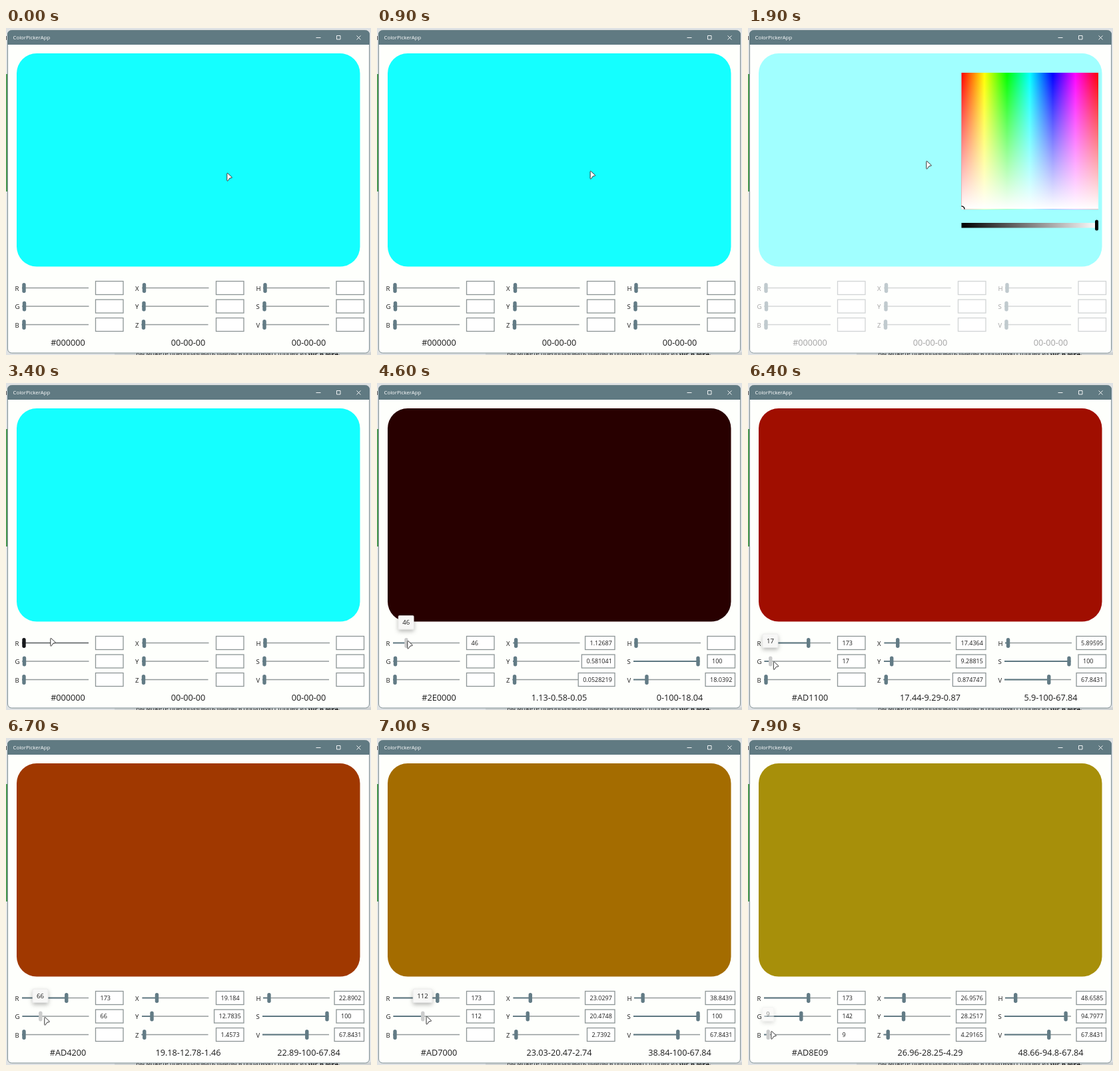
Recreate the animation shown at these times as an HTML page. Size 548 by 490 pixels, loop 8 s.

```html
<!DOCTYPE html>
<html lang="en">
<head>
<meta charset="utf-8">
<title>Color picker</title>
<style>
html, body { margin: 0; width: 100%; height: 100%; overflow: hidden; background: #dfe2e4; }
svg { display: block; width: 548px; height: 490px; }
text { font-family: "Open Sans", "Noto Sans", sans-serif; fill: #1c1c1c; white-space: pre; }
.entry { font-size: 9px; }
.name { font-size: 9.6px; }
.sum { font-size: 12.7px; text-anchor: middle; }
.tip { font-size: 9.6px; text-anchor: middle; }
</style>
</head>
<body>
<svg id="stage" viewBox="0 0 548 490">
  <defs>
    <linearGradient id="hue">
      <stop offset="0" stop-color="#f00"/><stop offset=".167" stop-color="#ff0"/>
      <stop offset=".333" stop-color="#0f0"/><stop offset=".5" stop-color="#0ff"/>
      <stop offset=".667" stop-color="#00f"/><stop offset=".833" stop-color="#f0f"/>
      <stop offset="1" stop-color="#f00"/>
    </linearGradient>
    <linearGradient id="fade" x2="0" y2="1">
      <stop offset="0" stop-color="#fff" stop-opacity="0"/><stop offset="1" stop-color="#fff"/>
    </linearGradient>
    <linearGradient id="gray"><stop offset="0"/><stop offset="1" stop-color="#fff"/></linearGradient>
    <filter id="shadow" x="-50%" y="-50%" width="200%" height="220%">
      <feDropShadow dx="0" dy="3" stdDeviation="3" flood-opacity=".28"/>
    </filter>
    <clipPath id="square"><rect x="320.5" y="67" width="205.5" height="204.5"/></clipPath>
  </defs>

  <rect width="548" height="490" fill="#dfe2e4"/>
  <rect y="69" width="4" height="176" fill="#4c9a55"/>
  <rect y="12" width="1" height="6" fill="#444"/>
  <rect x="163" y="486" width="385" height="4" fill="#d0d3d4"/>
  <text x="195" y="490.5" font-size="9.2">Вы можете преобразовать файлы в обратную сторону из <tspan font-weight="700">GIF в MP4.</tspan></text>

  <rect x="2.5" y="3.5" width="543" height="483.5" rx="6" fill="#fefffc" stroke="#7d8d92"/>
  <path d="M2 25V9.500a6 6 0 0 1 6-6H540a6 6 0 0 1 6 6V25Z" fill="#607a82"/>
  <text x="10.500" y="17" font-size="7.8" style="fill:#fff">ColorPickerApp</text>
  <path d="M465.500 14.500h7M496.500 11.500h5.500v5.500h-5.500ZM526.500 11.500l6 6m0-6l-6 6" fill="none" stroke="#fff" stroke-width=".9"/>

  <rect id="panel" x="16" y="38" width="515.500" height="319.500" rx="30"/>
  <g id="controls"></g>

  <g id="popup">
    <rect x="3" y="25" width="542" height="461.500" rx="5" fill="#fff" fill-opacity=".6"/>
    <rect x="320.500" y="67" width="205.500" height="204.500" fill="url(#hue)"/>
    <rect x="320.500" y="67" width="205.500" height="204.500" fill="url(#fade)"/>
    <circle cx="320.500" cy="271.500" r="4.500" fill="#fff" stroke="#000" stroke-width="1.500" clip-path="url(#square)"/>
    <rect x="320.500" y="292" width="205.500" height="7.500" fill="url(#gray)"/>
    <rect x="521" y="287.500" width="5" height="16" rx="2.500"/>
  </g>

  <path id="pointer" d="M.8 1.400Q.8 0 2 .8L8 6.400Q9 7.600 7.300 7.700L4.800 8.100L2.400 11.700Q1 13 .8 11.300Z"
    fill="#fff" stroke="#333" stroke-width="1" stroke-linejoin="round"/>
</svg>
<script>
const $ = id => document.getElementById(id);
const NS = "http://www.w3.org/2000/svg";
const LOOP = 8000, STEP = 100, START = 4100;

function add(parent, tag, attrs) {
  const el = document.createElementNS(NS, tag);
  set(el, attrs);
  return parent.appendChild(el);
}
function set(el, attrs) {
  for (const k in attrs) el.setAttribute(k, attrs[k]);
}
const clamp = v => Math.max(0, Math.min(1, v));

// Each key is [time, ...values]
function track(keys, t) {
  if (t <= keys[0][0]) return keys[0].slice(1);
  for (let i = 1; i < keys.length; i++) {
    const a = keys[i - 1], b = keys[i];
    if (t <= b[0]) {
      const k = (t - a[0]) / (b[0] - a[0]);
      return a.slice(1).map((v, j) => v + (b[j + 1] - v) * k);
    }
  }
  return keys[keys.length - 1].slice(1);
}

const pointerPath = [
  [0, 331, 217], [700, 331, 217], [1300, 296, 208], [1900, 267, 199], [2500, 258, 205],
  [2900, 160, 300], [3300, 68, 380], [3400, 66, 382], [3900, 28, 386], [4100, 28, 386],
  [4600, 45, 386], [5300, 81, 387], [5700, 93, 387], [5900, 92, 388], [6200, 31, 415],
  [6300, 31, 417], [6700, 57, 418], [7200, 84, 416], [7400, 83, 418], [7700, 31, 439], [7900, 34, 439]
];
const red = [[4000, 0], [4100, 2], [4600, 46], [5300, 143], [5700, 173]];
const green = [[6300, 0], [6700, 66], [7200, 142]];
const blue = [[7800, 0], [7900, 9]];
const shade = [
  [4100, 2, 0, 0], [4600, 40, 0, 0], [5300, 129, 0, 0], [5700, 160, 0, 0],
  [6300, 160, 0, 0], [6700, 160, 56, 0], [7200, 167, 143, 0], [7800, 167, 143, 0], [7900, 167, 143, 10]
];
const presses = [[4000, 5800], [6200, 7300], [7800, 8300]];

const columns = [
  { x: 13.5, right: 176, mid: 93, names: "RGB", max: [255, 255, 255] },
  { x: 194, right: 357, mid: 273.5, names: "XYZ", max: [95.047, 100, 108.883] },
  { x: 375.5, right: 537.5, mid: 454.5, names: "HSV", max: [360, 100, 100] }
];
const thumbStart = [[27, 27.5, 27], [207.5, 207, 206.5], [389, 388, 388]];
const rowY = [389.5, 417, 444.5];
const layer = $("controls");
const rows = [], sums = [];

columns.forEach((col, c) => {
  rowY.forEach((y, r) => {
    const x0 = thumbStart[c][r];
    const line = { y1: y, y2: y, x1: x0 - 3, x2: x0 + 97 };
    add(layer, "text", { class: "name", x: col.x, y: y + 4 }).textContent = col.names[r];
    rows.push({
      c, r, y, x0, max: col.max[r], right: col.right,
      base: add(layer, "line", { ...line, "stroke-width": 1.4 }),
      done: add(layer, "line", { ...line, stroke: "#5e7882", "stroke-width": 1.8 }),
      thumb: add(layer, "rect", { y: y - 7.5, width: 5.4, height: 15, rx: 2.7 }),
      box: add(layer, "rect", { y: y - 10, height: 20, fill: "#fff", stroke: "#8d9596", "stroke-width": 1.3 }),
      text: add(layer, "text", { class: "entry", y: y + 3 })
    });
  });
  sums.push(add(layer, "text", { class: "sum", x: col.mid, y: 476 }));
});

const tips = rowY.map(y => {
  const g = add(layer, "g", {});
  return {
    g,
    box: add(g, "rect", { y: y - 41, height: 20.5, rx: 1.5, fill: "#f7f7f6", stroke: "#ddd", "stroke-width": .5, filter: "url(#shadow)" }),
    text: add(g, "text", { class: "tip", y: y - 27.5 })
  };
});

function toXyz(rgb) {
  const [r, g, b] = rgb.map(v => {
    v /= 255;
    return 100 * (v > .04045 ? ((v + .055) / 1.055) ** 2.4 : v / 12.92);
  });
  return [
    .4124564 * r + .3575761 * g + .1804375 * b,
    .2126729 * r + .7151522 * g + .072175 * b,
    .0193339 * r + .119192 * g + .9503041 * b
  ];
}
function toHsv([r, g, b]) {
  const hi = Math.max(r, g, b), d = hi - Math.min(r, g, b);
  let h = 0;
  if (d) h = hi === r ? (g - b) / d : hi === g ? 2 + (b - r) / d : 4 + (r - g) / d;
  return [(h * 60 + 360) % 360, hi ? 100 * d / hi : 0, hi / 2.55];
}
const joined = v => v.map(n => Number(n.toFixed(2))).join("-");

function drawRow(row, value, pressed, hover) {
  const x = row.x0 + 94 * value / row.max;
  set(row.base, { stroke: hover ? "#53595b" : "#949b9c" });
  set(row.done, { x2: x });
  set(row.thumb, { x: x - 2.7, fill: pressed ? "#cbcccc" : hover ? "#17191c" : "#627b85" });
  const label = value ? String(Number(value.toPrecision(6))) : "";
  const dot = label.includes(".");
  const textWidth = 9.6 * (.539 * (label.length - dot) + .217 * dot);
  const width = Math.max(41.5, textWidth + 11.3);
  set(row.box, { x: row.right - width, width });
  set(row.text, { x: row.right - width + 7 });
  row.text.textContent = label;
}

function drawTip(i, value, t) {
  const [from, to] = presses[i];
  const alpha = Math.min(clamp((t - from) / 200), clamp((to + 200 - t) / 200));
  const x = rows[i].x0 + 94 * value / 255 - .3;
  const label = String(value);
  const width = 12 + 5.6 * label.length;
  set(tips[i].g, { opacity: alpha });
  set(tips[i].box, { x: x - width / 2, width });
  set(tips[i].text, { x });
  tips[i].text.textContent = label;
}

function draw(t) {
  const rgb = [red, green, blue].map(k => Math.round(track(k, t)[0]));
  const xyz = toXyz(rgb), hsv = toHsv(rgb);
  const values = [rgb, xyz, hsv];
  const live = t >= START;

  rows.forEach(row => {
    const own = row.c === 0;
    const pressed = own && t >= presses[row.r][0] && t < presses[row.r][1];
    const hover = own && row.r === 0 && t >= 3300 && t < 4000;
    drawRow(row, values[row.c][row.r], pressed, hover);
  });
  rgb.forEach((v, i) => drawTip(i, v, t));

  sums[0].textContent = "#" + rgb.map(v => v.toString(16).padStart(2, "0")).join("").toUpperCase();
  sums[1].textContent = live ? joined(xyz) : "00-00-00";
  sums[2].textContent = live ? joined(hsv) : "00-00-00";
  const fill = live ? track(shade, t).map(Math.round) : [20, 255, 255];
  set($("panel"), { fill: `rgb(${fill})` });

  set($("popup"), { opacity: Math.min(clamp((t - 900) / 200), clamp((2700 - t) / 200)) });
  const [px, py] = track(pointerPath, t);
  set($("pointer"), { transform: `translate(${px} ${py})` });
}

const begin = performance.now();
function tick(now) {
  const t = Math.max(0, now - begin) % LOOP;
  draw(Math.floor(t / STEP) * STEP);
  requestAnimationFrame(tick);
}
draw(0);
requestAnimationFrame(tick);
</script>
</body>
</html>
```
